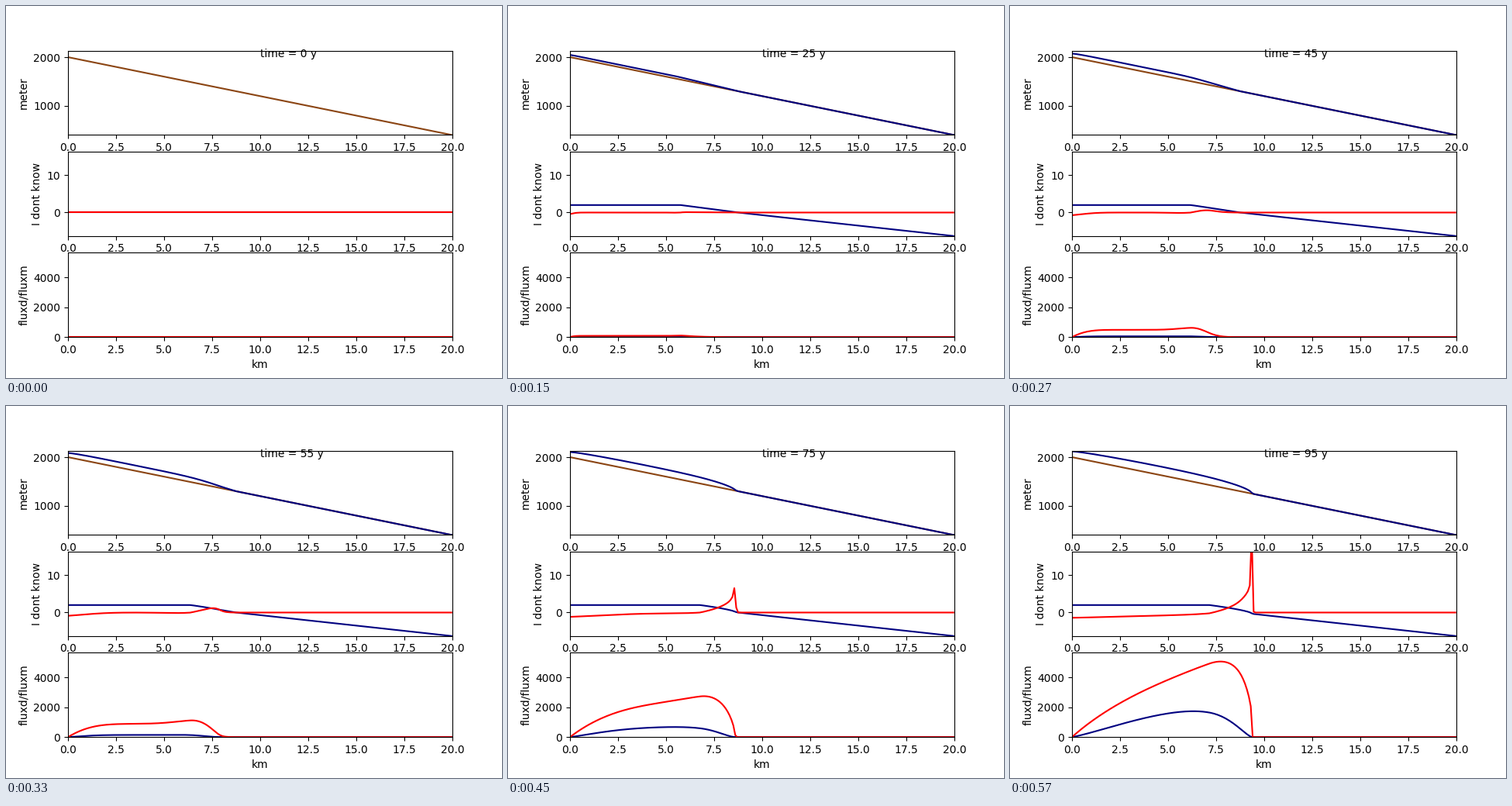
A matplotlib script that plays this animation: 640 by 480 pixels, repeating every 600 ms.

```python
import numpy as np
import matplotlib.pyplot as plt
from matplotlib.animation import FuncAnimation

# Flowline glacier on a sloping bed, lengths in m, time in years
YEAR = 365 * 24 * 3600
RHO_G = 917 * 9.81
DEFORM = 2 / 5 * 1.9e-24 * RHO_G**3 * YEAR
SLIDE = 5.7e-20 * RHO_G**3 * YEAR
ELA, GRADIENT, MAX_BALANCE = 1300, 0.007, 2

LENGTH, CELLS = 20000, 200
DX = LENGTH / CELLS
DT = 0.01
FRAMES, YEARS_PER_FRAME = 20, 5

edges = np.linspace(0, LENGTH, CELLS + 1)
x = (edges[:-1] + edges[1:]) / 2
bed = 2000 - 0.08 * x


def simulate():
    """Return one tuple (surface, balance, gain, deformation, sliding) per frame."""
    ice = np.zeros(CELLS)
    flux_d = np.zeros(CELLS + 1)
    flux_m = np.zeros(CELLS + 1)
    blank = np.full(CELLS, np.nan)
    states = [(blank, np.zeros(CELLS), np.zeros(CELLS), flux_d.copy(), flux_m.copy())]
    steps = round(YEARS_PER_FRAME / DT)
    for _ in range(FRAMES - 1):
        for _ in range(steps):
            surface = bed + ice
            slope = -np.diff(surface) / DX
            mid = (ice[:-1] + ice[1:]) / 2
            drive = (mid * slope) ** 3
            flux_d[1:-1] = DEFORM * drive * mid**2
            flux_m[1:-1] = SLIDE * drive
            gain = -np.diff(flux_d + flux_m) / DX
            balance = np.minimum(GRADIENT * (surface - ELA), MAX_BALANCE)
            ice = np.maximum(ice + DT * (balance + gain), 0)
        states.append((bed + ice, balance, gain, flux_d.copy(), flux_m.copy()))
    return states


states = simulate()

fig, (ax_h, ax_b, ax_f) = plt.subplots(3, 1, figsize=(6.4, 4.8), dpi=100)
panels = [
    (ax_h, "meter", (bed[-1], 2134)),
    (ax_b, "I dont know", (GRADIENT * (bed[-1] - ELA), 16.25)),
    (ax_f, "fluxd/fluxm", (0, 5660)),
]
for ax, label, limits in panels:
    ax.set_xlim(0, LENGTH / 1000)
    ax.set_ylim(*limits)
    ax.set_ylabel(label)
ax_f.set_xlabel("km")

km, edge_km = x / 1000, edges / 1000
ax_h.plot(km, bed, color="saddlebrown")
lines = [
    ax.plot(pos, np.zeros_like(pos), color=color)[0]
    for ax, pos, color in [
        (ax_h, km, "navy"),
        (ax_b, km, "navy"),
        (ax_b, km, "red"),
        (ax_f, edge_km, "navy"),
        (ax_f, edge_km, "red"),
    ]
]
clock = ax_h.text(10, 2000, "")


def update(i):
    for line, values in zip(lines, states[i]):
        line.set_ydata(values)
    clock.set_text(f"time = {i * YEARS_PER_FRAME} y")
    return [*lines, clock]


anim = FuncAnimation(fig, update, frames=FRAMES, interval=30, repeat=True, repeat_delay=0)
plt.show()
```
